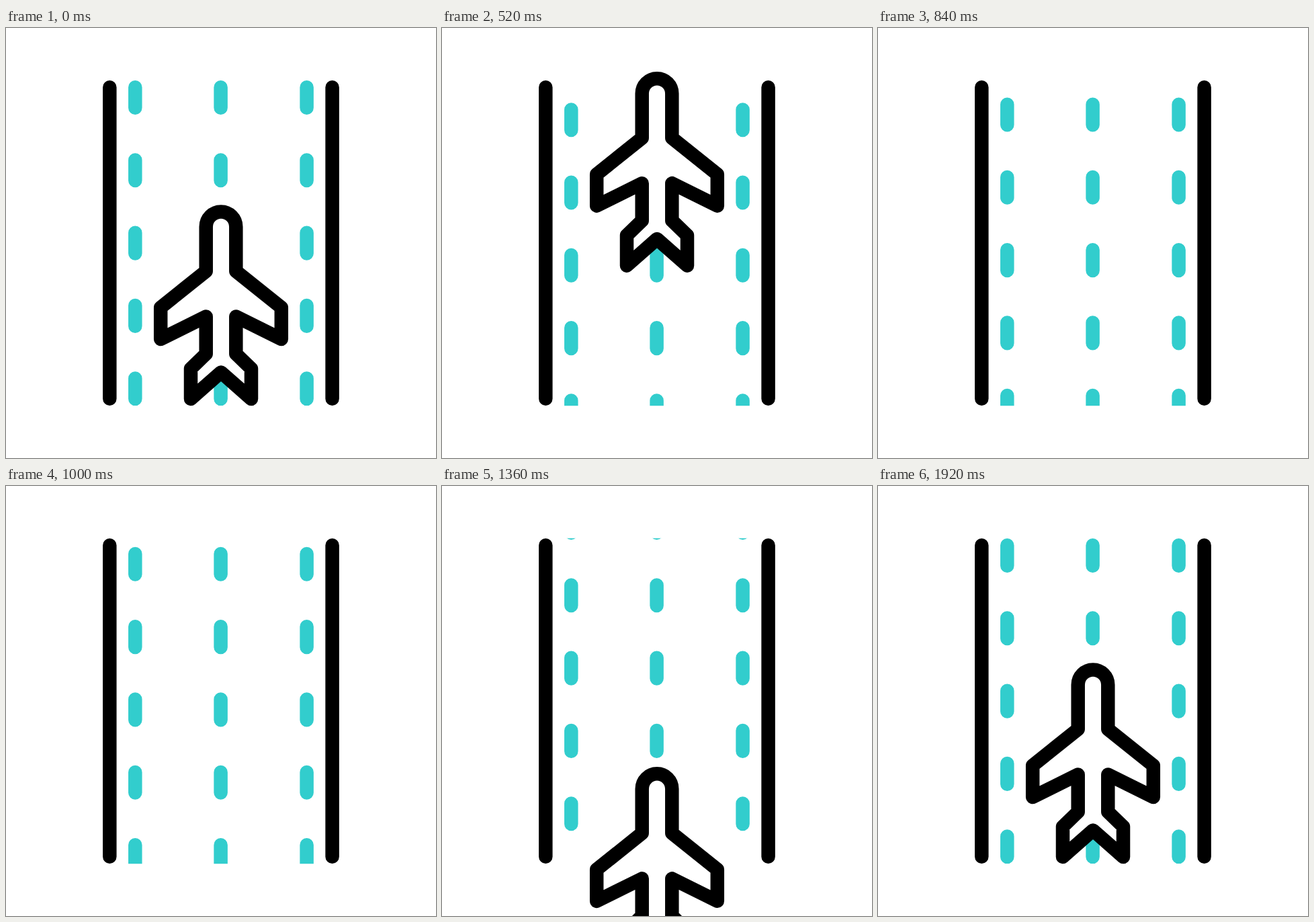
Write an HTML page that moves like this. It is 640x640 px and loops after 2000 ms.

```html
<!DOCTYPE html>
<html lang="en">
<head>
<meta charset="utf-8">
<title>Runway</title>
<style>
  html, body { margin: 0; width: 100%; height: 100%; overflow: hidden; background: #fff; }
  svg { display: block; width: 100%; height: 100%; }
</style>
</head>
<body>
<svg viewBox="0 0 640 640" fill="none" stroke-width="20.5" stroke-linecap="round" stroke-linejoin="round">
  <clipPath id="runway"><path d="M0 77.8H640V562.2H0z"/></clipPath>
  <g clip-path="url(#runway)" stroke="#32cdcd">
    <path id="dashes"/>
  </g>
  <path d="M154.3 88.2V551.8M485.6 88.2V551.8" stroke="#000"/>
  <path id="plane" fill="#fff" stroke="#000" d="M297.7 295.8a22.3 22.3 0 0 1 44.6 0V362L409.8 416V463L342.3 429.5V485L365 507V552L320 512.4L275 552V507L297.7 485V429.5L230.2 463V416L297.7 362z"/>
</svg>
<script>
const LOOP = 2000, STEP = 40, START = 40, END = 1920, MID = (START + END) / 2;
const GAP = 108.3, ROWS = 5, LAPS = 4, EASE = 0.64;
const dashes = document.getElementById('dashes');
const plane = document.getElementById('plane');

let d = '';
for (const x of [192.3, 319.6, 447.6])
  for (let row = -1; row < ROWS; row++) d += `M${x} ${88.2 + row * GAP}v30.6`;
dashes.setAttribute('d', d);

// Symmetric cubic-bezier(EASE, 0, 1 - EASE, 1), solved by bisection
function easeInOut(x) {
  let lo = 0, hi = 1, s;
  for (let i = 0; i < 30; i++) {
    s = (lo + hi) / 2;
    const r = 1 - s;
    const at = 3 * EASE * s * r * r + 3 * (1 - EASE) * s * s * r + s ** 3;
    if (at < x) lo = s; else hi = s;
  }
  return s * s * (3 - 2 * s);
}

// Speeds away past the top, then glides in from below
function planeY(t) {
  return t < MID
    ? -65.7 * ((t - START) / 280) ** 2.05
    : 48.9 * ((END - t) / 320) ** 2.06;
}

const moveY = (el, y) => el.setAttribute('transform', `translate(0 ${y.toFixed(2)})`);

function draw() {
  const step = Math.floor(performance.now() % LOOP / STEP) * STEP;
  const t = Math.min(END, Math.max(START, step));
  const run = t === START || t === END ? 0 : easeInOut((t - START) / (END - START));
  moveY(dashes, run * LAPS * GAP % GAP);
  moveY(plane, planeY(t));
  requestAnimationFrame(draw);
}
draw();
</script>
</body>
</html>
```
